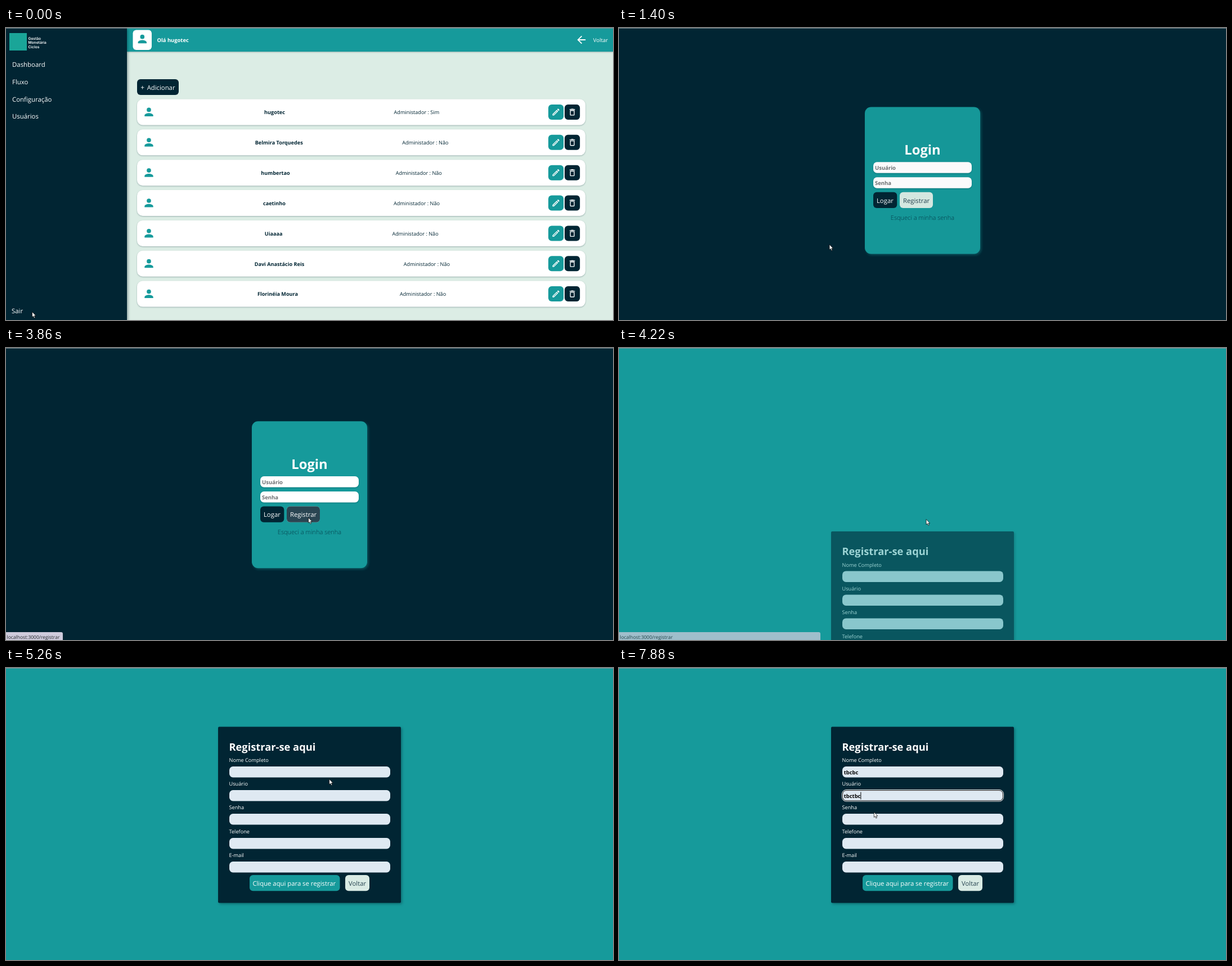
Animation of 1079x519 px, one loop 8 s. Source, as an HTML page:

```html
<!DOCTYPE html>
<html lang="pt">
<head>
<meta charset="utf-8">
<title>Painel</title>
<style>
  html, body { margin: 0; width: 100%; height: 100%; overflow: hidden; background: #012533; }
  svg { display: block; width: 100vw; height: 100vh; font-family: "Open Sans", "Noto Sans", sans-serif; }
  text { text-rendering: geometricPrecision; }
  .soft { filter: drop-shadow(0 1px 1px rgba(0, 40, 50, .3)); }
  .glow { filter: drop-shadow(2px 2px 2px rgba(22, 154, 155, .4)); }
  .deep { filter: drop-shadow(2px 2px 2px rgba(0, 30, 40, .35)); }
</style>
</head>
<body>
<svg id="stage" viewBox="0 0 1079 519" preserveAspectRatio="none"></svg>
<script>
const LOOP = 8000;
const DARK = '#012533', TEAL = '#169a9b', MINT = '#dcede5', WHITE = '#fff', FAINT = '#043c49';
const ICON = {
  person: 'M12 12a4 4 0 1 0 0-8 4 4 0 0 0 0 8m0 2c-2.67 0-8 1.34-8 4v2h16v-2c0-2.66-5.33-4-8-4',
  back: 'M20 11H7.83l5.59-5.59L12 4l-8 8 8 8 1.41-1.41L7.83 13H20z',
  edit: 'M14.06 9.02l.92.92L5.92 19H5v-.92l9.06-9.06M17.66 3c-.25 0-.51.1-.7.29l-1.83 1.83 3.75 3.75 1.83-1.83c.39-.39.39-1.02 0-1.41l-2.34-2.34c-.2-.2-.45-.29-.71-.29zM14.06 6.19L3 17.25V21h3.75L17.81 9.94z',
  bin: 'M6 19c0 1.1.9 2 2 2h8c1.1 0 2-.9 2-2V7H6zM8 9h8v10H8zM15.5 4l-1-1h-5l-1 1H5v2h14V4z'
};
const stage = document.getElementById('stage');

function add(parent, tag, attrs = {}) {
  const el = document.createElementNS('http://www.w3.org/2000/svg', tag);
  for (const k in attrs) el.setAttribute(k, attrs[k]);
  return parent.appendChild(el);
}
const group = (parent, attrs) => add(parent, 'g', attrs);
const rect = (parent, x, y, width, height, rx, fill, more) =>
  add(parent, 'rect', { x, y, width, height, rx, fill, ...more });
function text(parent, str, x, y, size, fill, more) {
  const el = add(parent, 'text', { x, y, 'font-size': size, fill, ...more });
  el.textContent = str;
  return el;
}
const BOLD = { 'font-weight': 700 }, MEDIUM = { 'font-weight': 500 };
const icon = (parent, name, cx, cy, scale, fill) => add(parent, 'path', {
  d: ICON[name], fill, 'fill-rule': 'evenodd',
  transform: `translate(${cx} ${cy}) scale(${scale}) translate(-12 -12)`
});

// User list
const list = group(stage);
rect(list, 0, 0, 1079, 519, 0, MINT);
rect(list, 215, 0, 864, 42, 0, TEAL, { class: 'soft' });
rect(list, 0, 0, 215, 519, 0, DARK, { class: 'deep' });
rect(list, 6, 9, 31, 31, 0, '#1aa598');
['Gestão', 'Monetária', 'Ciclos'].forEach((s, i) =>
  text(list, s, 39.5, 20.8 + i * 7.5, 6.6, WHITE, { 'font-family': 'Inter, sans-serif', 'font-weight': 600 }));
['Dashboard', 'Fluxo', 'Configuração', 'Usuários'].forEach((s, i) =>
  text(list, s, 11, 69.2 + i * 30.7, 11.4, WHITE, MEDIUM));
text(list, 'Sair', 10, 507, 11.4, WHITE, MEDIUM);
rect(list, 225.5, 3.5, 33.5, 35.5, 6, WHITE);
icon(list, 'person', 242.3, 19.5, .96, TEAL);
text(list, 'Olá hugotec', 268.5, 25, 9.4, WHITE, BOLD);
icon(list, 'back', 1022.8, 21, .92, WHITE);
text(list, 'Voltar', 1043.8, 25, 9.5, WHITE);
rect(list, 233, 91, 74, 28, 6, DARK);
text(list, '+', 239.2, 110.2, 12, WHITE, MEDIUM);
text(list, 'Adicionar', 250.7, 110.2, 11.3, WHITE, MEDIUM);
[
  ['hugotec', 477.5, 'Sim', 689.6],
  ['Belmira Torquedes', 485.2, 'Não', 704.3],
  ['humbertao', 479, 'Não', 692.7],
  ['caetinho', 477, 'Não', 688.9],
  ['Uiaaaa', 475.7, 'Não', 686.5],
  ['Davi Anastácio Reis', 486, 'Não', 706.8],
  ['Florinéia Moura', 483, 'Não', 700]
].forEach(([name, mid, admin, x], i) => {
  const cy = 149.5 + i * 53.85;
  rect(list, 233, cy - 23, 797, 46, 10, WHITE, { class: 'soft' });
  icon(list, 'person', 254, cy - .2, .96, TEAL);
  text(list, name, mid, cy + 3.8, 9.15, DARK, { ...BOLD, 'text-anchor': 'middle' });
  text(list, 'Administador : ' + admin, x, cy + 3.8, 9.15, DARK);
  rect(list, 964, cy - 13.5, 27.2, 27, 6, TEAL);
  icon(list, 'edit', 977.6, cy, .68, WHITE);
  rect(list, 993, cy - 13.5, 27.2, 27, 6, DARK);
  icon(list, 'bin', 1006.6, cy, .68, WHITE);
});

// Login
const login = group(stage);
rect(login, 0, 0, 1079, 519, 0, DARK);
const loginCard = group(login);
rect(loginCard, 437, 130.3, 205, 261, 11, TEAL, { class: 'glow' });
text(loginCard, 'Login', 539.5, 215, 23.8, WHITE, { ...BOLD, 'text-anchor': 'middle' });
['Usuário', 'Senha'].forEach((s, i) => {
  rect(loginCard, 452, 228 + i * 27, 175, 19.5, 6.5, WHITE, { class: 'soft' });
  text(loginCard, s, 455, 241.6 + i * 27, 9.5, '#6d7073', BOLD);
});
function button(parent, label, x, y, w, fill, color, tx) {
  const g = group(parent);
  rect(g, x, y, w, 28.3, 6, fill);
  text(g, label, tx, y + 18.9, 11.3, color, MEDIUM);
  return g;
}
button(loginCard, 'Logar', 452, 281.5, 42.3, DARK, WHITE, 458);
button(loginCard, 'Registrar', 499, 281.5, 59, '#d9ebe4', '#24424f', 505);
const hover = button(loginCard, 'Registrar', 499, 281.5, 59, '#2a4552', WHITE, 505);
const forgot = text(loginCard, 'Esqueci a minha senha', 539.5, 330.8, 11,
  FAINT, { 'font-weight': 300, 'text-anchor': 'middle' });

// Registration
const FIELD_TOP = 175, FIELD_STEP = 42.2, FIELD_H = 19.5;
const register = group(stage);
rect(register, 0, 0, 1079, 519, 0, TEAL);
const formCard = group(register);
rect(formCard, 377, 104.5, 325, 313, 2, DARK, { class: 'deep' });
text(formCard, 'Registrar-se aqui', 396.5, 147, 18.3, WHITE, BOLD);
const fields = ['Nome Completo', 'Usuário', 'Senha', 'Telefone', 'E-mail'].map((label, i) => {
  const y = Math.round(FIELD_TOP + i * FIELD_STEP);
  text(formCard, label, 396.5, y - 7.8, 9.2, WHITE, MEDIUM);
  rect(formCard, 397, y, 286, FIELD_H, 6.5, '#dfe9f2');
  const ring = group(formCard, { fill: 'none' });
  rect(ring, 396.5, y - .5, 287, FIELD_H + 1, 7.5, 'none', { stroke: WHITE });
  rect(ring, 397.5, y + .5, 285, FIELD_H - 1, 6.5, 'none', { stroke: '#101010' });
  const value = text(formCard, '', 399.8, y + 13.6, 9.35, '#000', BOLD);
  const caret = rect(formCard, 400, y + 3.5, 1, 13, 0, '#000');
  return { ring, value, caret };
});
button(formCard, 'Clique aqui para se registrar', 433, 368, 160.5, TEAL, WHITE, 438.4);
button(formCard, 'Voltar', 603, 368, 43, '#d9ebe4', '#24424f', 609);

// Browser parts
rect(stage, 0, 0, 1079, 1, 0, '#8d9a9f', { opacity: .8 });
const status = group(stage);
const statusBar = rect(status, -4, 505, 105, 18, 3, '#cecbdc');
text(status, 'localhost:3000/registrar', 1.5, 516.5, 8.5, '#22262c');

const arrow = add(stage, 'path', {
  d: 'M0 0V9.4l2.1-1.9 1.5 3.5 1.6-.7-1.5-3.3h2.9z',
  fill: WHITE, stroke: '#000', 'stroke-width': .7
});
const beam = add(stage, 'path', {
  d: 'M-2.5-4.6H-.6L0-4.2.6-4.6H2.5M0-4.2V4.2M-2.5 4.6H-.6L0 4.2.6 4.6H2.5',
  fill: 'none', stroke: '#3a3838', 'stroke-width': .9
});

// Pointer: time, x, y
const POINTER = [
  [0, 46.5, 504.5], [439, 46.5, 504.5], [440, 42, 499], [670, 42, 499],
  [1400, 373, 385], [1580, 565, 340], [1640, 564, 335], [1960, 556, 306],
  [2280, 556, 305], [2450, 561, 307], [2700, 561, 308], [3010, 556, 305],
  [3140, 556, 305], [3500, 540, 301], [3860, 537.5, 301.5], [3920, 538, 302],
  [4220, 546, 304.5], [4610, 580, 283], [4900, 588, 240], [5360, 571, 186],
  [5620, 570, 186], [5860, 512.5, 236], [6740, 512.5, 236], [7080, 480, 233.5],
  [7260, 475, 233.5], [7440, 475, 233.5], [7880, 453.3, 256], [LOOP, 453.3, 256]
];
const TYPING = [
  { word: 'tbcbc', from: 5360, to: 7000, keys: [6330, 6450, 6540, 6660, 6760] },
  { word: 'tbctbc', from: 7000, to: LOOP, keys: [7440, 7520, 7600, 7680, 7760, 7850] }
];

const ramp = (t, a, b) => Math.min(1, Math.max(0, (t - a) / (b - a)));
const show = (el, on) => { el.style.display = on ? '' : 'none'; };

// The CSS "ease" curve
function ease(x) {
  if (x <= 0 || x >= 1) return x <= 0 ? 0 : 1;
  let lo = 0, hi = 1, s = .5;
  for (let i = 0; i < 24; i++) {
    s = (lo + hi) / 2;
    if (.75 * s * (1 - s) + s ** 3 < x) lo = s; else hi = s;
  }
  return .3 * s * (1 - s) ** 2 + 3 * s * s * (1 - s) + s ** 3;
}

// Cards rise one stage height while fading in; returns the offset left.
function rise(card, t, start) {
  const p = ease((t - start) / 970), dy = 519 * (1 - p);
  card.setAttribute('transform', `translate(0 ${dy})`);
  card.setAttribute('opacity', p);
  return dy;
}

function pointerAt(t) {
  const i = Math.max(1, POINTER.findIndex(p => p[0] > t));
  const [a, x0, y0] = POINTER[i - 1], [b, x1, y1] = POINTER[i];
  const k = ramp(t, a, b);
  return [x0 + (x1 - x0) * k, y0 + (y1 - y0) * k];
}

function overField(x, y, dy) {
  const edge = 2, rel = y - dy - FIELD_TOP + edge;
  return x > 397 && x < 683 && rel > 0 && rel < fields.length * FIELD_STEP && rel % FIELD_STEP < FIELD_H + edge;
}

function draw(t) {
  const onForm = t >= 3920;
  show(list, t < 620);
  show(login, t >= 620 && !onForm);
  show(register, onForm);

  rise(loginCard, t, 607);
  const dy = rise(formCard, t, 3899);

  hover.setAttribute('opacity', ramp(t, 1910, 2110) - ramp(t, 2280, 2480) + ramp(t, 2810, 3010));
  forgot.setAttribute('fill', t > 1600 && t < 1760 ? DARK : FAINT);

  fields.forEach(({ ring, value, caret }, i) => {
    const job = TYPING[i];
    const focused = !!job && t >= job.from && t < job.to;
    show(ring, focused);
    const count = job ? job.keys.filter(k => t >= k).length : 0;
    const typed = job ? job.word.slice(0, count) : '';
    if (value.textContent !== typed) value.textContent = typed;
    show(caret, focused && (count > 0 || t - job.from < 500));
    if (focused && onForm) caret.setAttribute('x', 399.8 + (typed ? value.getComputedTextLength() : 0));
  });

  status.setAttribute('opacity', ramp(t, 3250, 3370) - ramp(t, 4170, 4370));
  statusBar.setAttribute('width', 105 + 257 * ramp(t, 3950, 4100));

  const [x, y] = pointerAt(t);
  const isBeam = onForm && overField(x, y, dy);
  show(arrow, !isBeam);
  show(beam, isBeam);
  (isBeam ? beam : arrow).setAttribute('transform', `translate(${x} ${y})`);
}

const begin = performance.now();
function tick() {
  draw((performance.now() - begin) % LOOP);
  requestAnimationFrame(tick);
}
tick();
</script>
</body>
</html>
```
